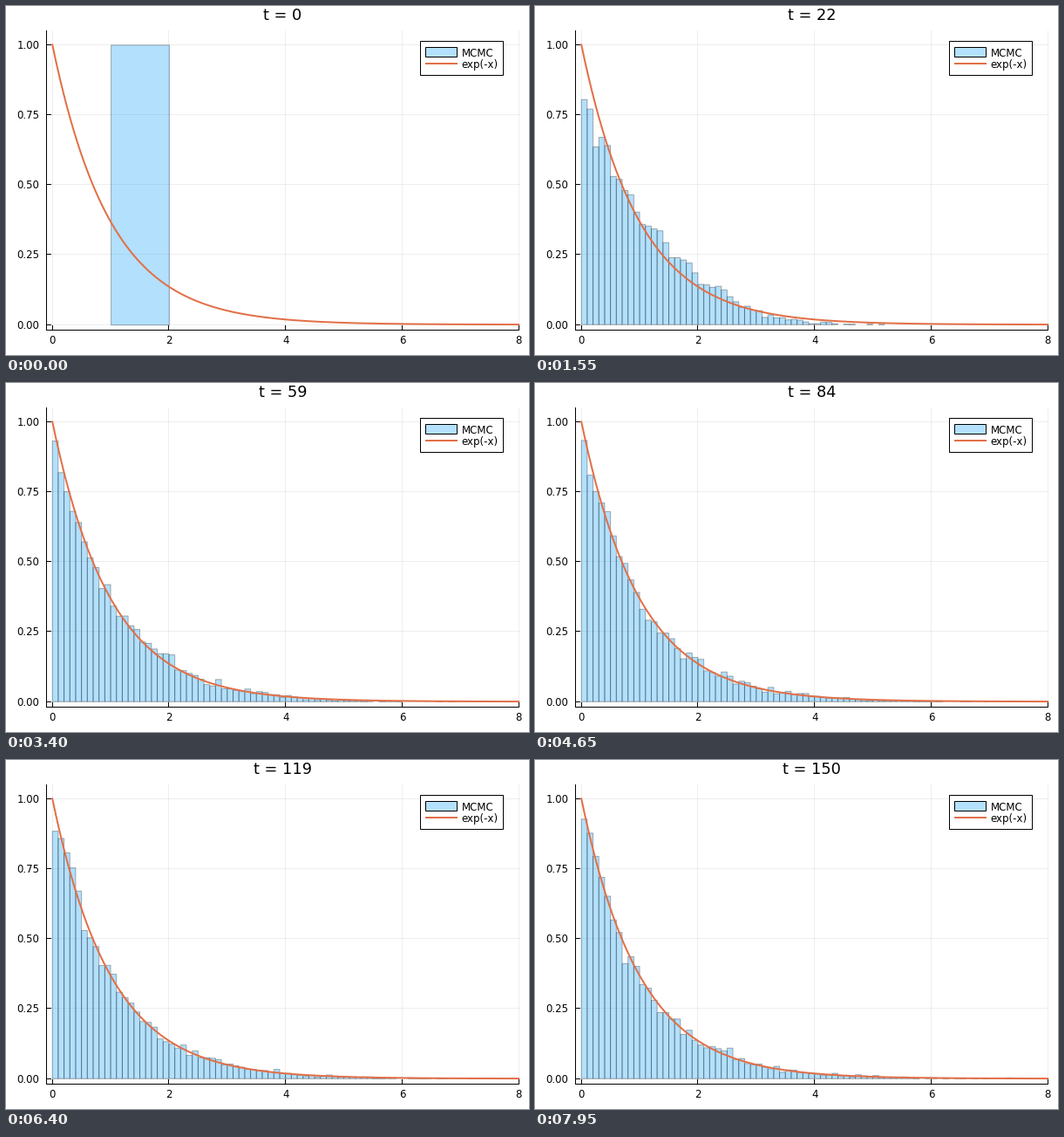
Recreate the animation shown at these times as a matplotlib script. Size 600x400 px, loop 8000 ms.

```python
import numpy as np
import matplotlib.pyplot as plt
from matplotlib.animation import FuncAnimation
from matplotlib.collections import PolyCollection
from matplotlib.patches import Rectangle

W, H, DPI = 600, 400, 100
PX = 72 / DPI                      # one pixel in points
FRAMES, INTERVAL, HOLD = 160, 50, 9
LEFT, RIGHT, TOP, BOTTOM = 46.5, 588.2, 28.3, 371.6
BLUE, ORANGE = (0, 0x9A / 255, 0xFA / 255), "#E26F47"
N, STEP = 10000, 0.33

plt.rcParams["font.family"] = "DejaVu Sans"


def simulate(steps):
    """Random pairs trade amounts; a trade needs both to stay positive."""
    rng = np.random.default_rng(7)
    x = np.ones(N)
    states = [x.copy()]
    for _ in range(steps):
        for _ in range(2):
            a, b = rng.permutation(N).reshape(2, -1)
            d = rng.uniform(-STEP, STEP, N // 2)
            d *= (x[a] + d >= 0) & (x[b] - d >= 0)
            x[a] += d
            x[b] -= d
        states.append(x.copy())
    return states


def bin_width(x):
    """Freedman-Diaconis width rounded to 1, 2 or 5 times a power of ten."""
    q1, q3 = np.percentile(x, [25, 75])
    if q3 == q1:
        return 1.0
    span = np.ptp(x)
    raw = span / np.ceil(span / (2 * (q3 - q1) / N ** (1 / 3)))
    base = 10.0 ** np.floor(np.log10(raw))
    for limit, factor in ((1.1, 1), (2.2, 2), (5.5, 5)):
        if raw / base <= limit:
            return base * factor
    return base * 10


def px(v):
    return LEFT + (v + 0.1) / 8.1 * (RIGHT - LEFT)


def py(v):
    return BOTTOM - (v + 0.02) / 1.07 * (BOTTOM - TOP)


def bars(x):
    w = bin_width(x)
    counts = np.bincount(np.floor(x / w + 1e-9).astype(int))
    shapes = []
    for i, c in enumerate(counts):
        if c:
            x0, x1, top = px(i * w), px((i + 1) * w), py(c / N / w)
            shapes.append([(x0, py(0)), (x0, top), (x1, top), (x1, py(0))])
    return shapes


# One axes in pixels, y pointing down
fig = plt.figure(figsize=(W / DPI, H / DPI), dpi=DPI, facecolor="white")
ax = fig.add_axes([0, 0, 1, 1])
ax.set(xlim=(0, W), ylim=(H, 0))
ax.axis("off")


def rule(x0, y0, x1, y1, color="black", **style):
    """Hairline on whole pixels."""
    ax.plot(np.floor([x0, x1]), np.floor([y0, y1]), color=color, lw=PX, **style)


def label(x, y, s, ha="center", size=11.8):
    return ax.text(x, y, s, ha=ha, va="baseline", fontsize=size * PX, zorder=7)


def box(x0, y0, x1, y1, fill):
    ax.add_patch(Rectangle((x0, y0), x1 - x0, y1 - y0, lw=PX, fc=fill, ec="black", zorder=6))


for v in range(0, 9, 2):
    rule(px(v), TOP, px(v), BOTTOM, alpha=0.065, zorder=1)
    rule(px(v), BOTTOM, px(v), BOTTOM - 5, zorder=5)
    label(px(v), 387, str(v))
for v in np.linspace(0, 1, 5):
    rule(LEFT, py(v), RIGHT, py(v), alpha=0.065, zorder=1)
    rule(LEFT, py(v), LEFT + 5, py(v), zorder=5)
    label(38.4, py(v) + 4.4, f"{v:.2f}", "right")
rule(LEFT, TOP, LEFT, BOTTOM, zorder=5)
rule(LEFT, BOTTOM, RIGHT, BOTTOM, zorder=5)
title = label((LEFT + RIGHT) / 2, 16, "t = 0", size=17.8)

frame = Rectangle((LEFT, TOP), RIGHT - LEFT, BOTTOM - TOP, transform=ax.transData)
hist = PolyCollection([], facecolors=[(*BLUE, 0.3)], edgecolors=[(0, 0, 0, 0.3)],
                      linewidths=PX, zorder=3)
hist.set_snap(False)
ax.add_collection(hist, autolim=False)
hist.set_clip_path(frame)
xs = np.linspace(0, 8, 400)
ax.plot(px(xs), py(np.exp(-xs)), color=ORANGE, lw=2 * PX, zorder=4)

box(475, 40, 570, 79, "white")
box(481, 47, 517, 58, "#B3E1FE")
ax.plot([481, 518], [66, 66], color=ORANGE, lw=2 * PX, solid_capstyle="butt", zorder=7)
label(522.8, 57.5, "MCMC", "left")
label(522.8, 70.6, "exp(-x)", "left")

shapes = [bars(x) for x in simulate(FRAMES - 1 - HOLD)]


def draw(k):
    t = max(0, k - HOLD)
    hist.set_verts(shapes[t])
    title.set_text(f"t = {t}")
    return hist, title


anim = FuncAnimation(fig, draw, frames=FRAMES, interval=INTERVAL,
                     init_func=lambda: draw(0), repeat=True, repeat_delay=0)
plt.show()
```
